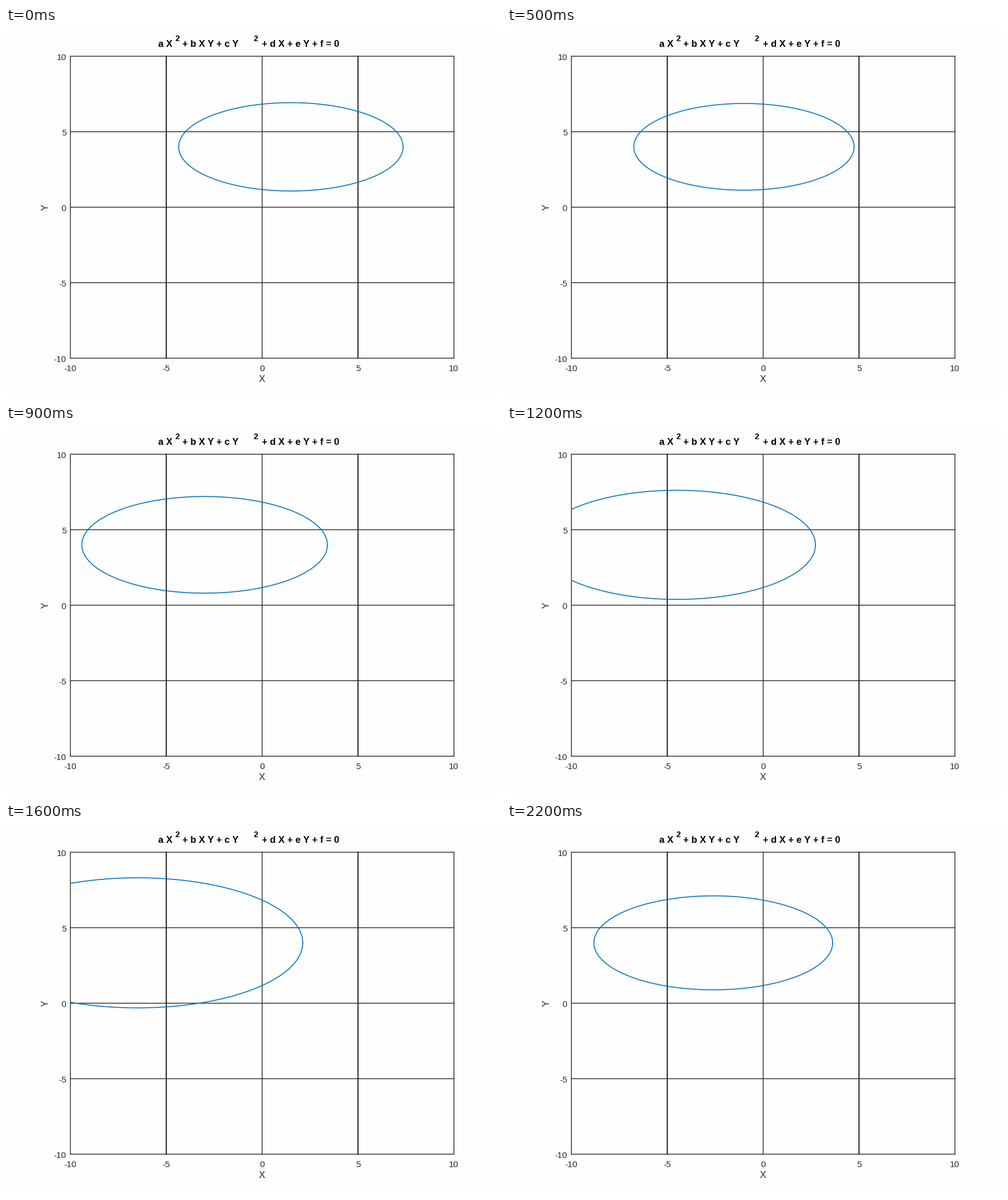
A matplotlib script that plays this animation: 865x647 px, repeating every 2300 ms.

```python
import numpy as np
import matplotlib.pyplot as plt
from matplotlib.animation import FuncAnimation

W, H, DPI = 865, 647, 64
LEFT, RIGHT, TOP, BOTTOM = 112.5, 782.7, 49.4, 577.4
INK, BLUE = "#262626", "#0072bd"
PX = 72 / DPI  # points per pixel

plt.rcParams["font.family"] = "Liberation Sans"
fig = plt.figure(figsize=(W / DPI, H / DPI), dpi=DPI, facecolor="#fefefe")
ax = fig.add_axes([LEFT / W, 1 - BOTTOM / H, (RIGHT - LEFT) / W, (BOTTOM - TOP) / H])
ax.set(xlim=(-10, 10), ylim=(-10, 10))
ax.axis("off")


def label(x, y, text, size=15, ha="center", color=INK, **kw):
    """Place text with its baseline at pixel (x, y), measured from the top left."""
    fig.text(x / W, 1 - y / H, text, fontsize=size * PX, ha=ha, va="baseline",
             color=color, **kw)


def rule(xs, ys, width=1.4):
    ax.plot(xs, ys, color=INK, lw=width * PX, clip_on=False, snap=False,
            solid_capstyle="projecting", zorder=1)


for v in range(-10, 11, 5):
    rule([v, v], [-10, 10], 2 if abs(v) == 5 else 1.4)
    rule([-10, 10], [v, v])
    x = LEFT + (v + 10) / 20 * (RIGHT - LEFT)
    y = BOTTOM - (v + 10) / 20 * (BOTTOM - TOP)
    label(x, 599.5, str(v))
    label(105.3, y + 7, str(v), ha="right")

label(447.6, 619, "X", 16.5)
label(73.5, 313.4, "Y", 16.5, rotation=90, rotation_mode="anchor")

for x, y, text, size in [
    (266.5, 33, "a X", 16.5),
    (295, 23, "2", 14),
    (307.8, 33, "+ b X Y + c Y", 16.5),
    (432.7, 23, "2", 14),
    (446.8, 33, "+ d X + e Y + f = 0", 16.5),
]:
    label(x, y, text, size, ha="left", color="black", weight="bold")

curve, = ax.plot([], [], color=BLUE, lw=1.6 * PX, zorder=3)
theta = np.linspace(0, 2 * np.pi, 361)

# Values of d in X^2 + 4 Y^2 + d X - 32 Y + 32 = 0
D = np.concatenate([np.arange(-3, 16), 4 + 0.4 * np.arange(4)])


def draw(i):
    cx = -D[i] / 2
    r = np.sqrt(32 + cx ** 2)
    curve.set_data(cx + r * np.cos(theta), 4 + r / 2 * np.sin(theta))
    return curve,


anim = FuncAnimation(fig, draw, frames=len(D), interval=100, repeat=True,
                     repeat_delay=0)
plt.show()
```
